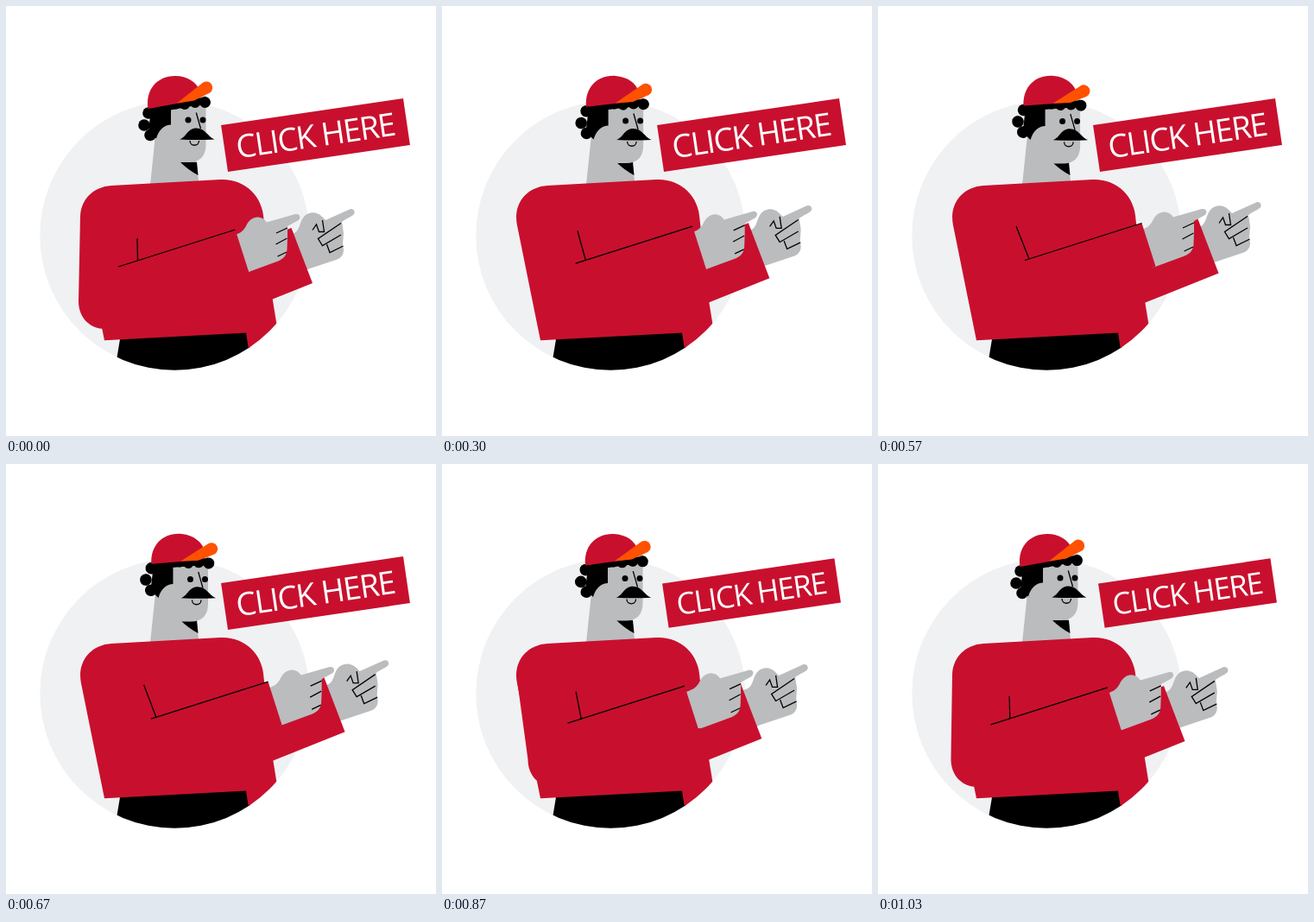
An HTML page that plays this animation: 498x498 px, repeating every 1060 ms.

```html
<!DOCTYPE html>
<html lang="en">
<head>
<meta charset="utf-8">
<title>Click here</title>
<style>
  html, body { margin: 0; width: 100%; height: 100%; overflow: hidden; background: #fff; }
  svg { display: block; width: 100vw; height: 100vh; }
  .red { fill: #c8102e; }
  .skin { fill: #bbbcbe; }
  .line { fill: none; stroke: #000; stroke-width: 1.3; }
  text { font: 400 37px "Open Sans", "Noto Sans", sans-serif; letter-spacing: -1.5px; fill: #fff; text-anchor: middle; }
</style>
</head>
<body>
<svg viewBox="0 0 498 498">
  <defs><clipPath id="disc"><circle cx="195.300" cy="265.800" r="156"/></clipPath></defs>
  <circle cx="195.300" cy="265.800" r="156" fill="#f0f1f3"/>

  <!-- far arm -->
  <g id="farHand">
    <path class="skin" d="M300 276 L334 263 C341 259 340 248 346 243 C352 238 360 238 366 244 L370 248 L398 235.400 C402 234 405 238 403 241 C402 243 396 245 389 250 L391 263 L390 276 L391 282 C391 288 388 292 382 294 L349 305 L318 318 Z"/>
    <path class="line" d="M355 259.500 L359.500 253 L362.500 261.500 L368.500 261.500 L366.500 248 M388 251.500 L361.500 269.500 L366.500 277.500 L388 265 M371.500 276 L375 285.500 L390.500 278"/>
  </g>
  <path id="farSleeve" class="red" d="M330.500 257 L355 321 L255 361 L230 297 Z"/>

  <!-- neck -->
  <path class="skin" d="M174 140 L166.500 212 L224 212 L220 175 Z"/>
  <path d="M201 180 L221 181 L222.500 196 Q211 190 201 180 Z"/>

  <g clip-path="url(#disc)">
    <path d="M133 380 L128 410 L128 430 L290 430 L278 374 Z"/>
    <path class="red" d="M114 387.300 L87 254 C82 229 98 209.500 122 208 L248 201 C276 199.500 297.500 220 298.500 247 L308.500 338 L313.500 369 L320 430 L286 430 L278 378.500 Z"/>
    <path id="elbow" class="red"/>
  </g>

  <!-- head -->
  <g id="face">
    <path class="skin" d="M174 112 L231.500 104 L231.500 161 C231.500 174 224 181 212 181 L196 181 L172 165 Z"/>
    <path d="M168 119 L191 113 L191 137.500 C184 137.500 177 143 174 153.500 L165 145 Z"/>
    <circle cx="211" cy="132" r="3.500"/>
    <circle cx="228" cy="132" r="3.500"/>
    <path class="line" d="M220.300 123.500 L225.500 142"/>
    <path class="line" d="M213 156 C213 163 223.500 163 223.500 156"/>
  </g>
  <path id="moustache" d="M201 154.500 C209 152 210 141.500 220.500 141.500 C231 141.500 233 151 241.500 154.500 Q221 155.500 201 154.500 Z"/>
  <g id="cap">
    <path d="M168 118 L217 107 L231 106 L231 113 L188 121 L172 124 Z"/>
    <g id="curls"></g>
    <path class="red" d="M164.500 119 C161 97 175 81 196 81 C210 81 220 88 224 97 L217 109.500 Z"/>
    <path fill="#ff5100" d="M198 112.500 L228 88.700 A7.100 7.100 0 0 1 236 100.500 L218 109.600 Z"/>
  </g>

  <!-- near arm -->
  <g id="nearHand">
    <path class="skin" d="M244 274 L267 264.500 C279 260 277 252 284 247 C290 242.500 298 244 302 250.500 L335 241 C341 240 342 246 338 248.500 L326 255 L326 268 L325.500 282 C325 289 321 293 315 295.500 L281 308 L254 311 Z"/>
    <path class="line" d="M313 263 L326 257 M312.500 276 L325.500 269 M314.500 290 L325 285"/>
  </g>
  <g id="nearSleeve">
    <path class="red" d="M265.500 259 L281.500 309 L171.500 344 L130 302 Z"/>
    <path class="line" d="M130 302 L265.500 259"/>
  </g>
  <path id="fold" class="line"/>

  <g id="sign">
    <rect class="red" x="-106.600" y="-27.300" width="213.200" height="54.600"/>
    <text x="-0.500" y="13.600">CLICK HERE</text>
  </g>
</svg>
<script>
const LOOP = 1060, STEP = 33.34;
const el = id => document.getElementById(id);
const set = (id, value, attr = "transform") => el(id).setAttribute(attr, value);

const curls = [[165, 124, 6.8], [160, 138, 6.8], [167, 149.5, 6.8],
               [197, 114.5, 5], [207, 114, 6], [219, 111.5, 6.5], [230.5, 111.5, 6.5]];
el("curls").innerHTML = curls.map(([x, y, r]) => `<circle cx="${x}" cy="${y}" r="${r}"/>`).join("");

const ease = (t, from, to) => {
  const u = Math.min(1, Math.max(0, (t - from) / (to - from)));
  return (1 - Math.cos(Math.PI * u)) / 2;
};
const lift = (p, height) => -height * Math.pow(p, 1.4);
const move = (id, x, y) => set(id, `translate(${x} ${y})`);

function draw(t) {
  const out = ease(t, 30, 500);
  const arm = out * (1 - ease(t, 600, 1066));
  const hand = out * (1 - ease(t, 640, 1095)); // trails the sleeve on the way back
  const dx = 40 * arm, dy = lift(arm, 7.5);

  move("nearHand", 40 * hand, lift(hand, 6));
  move("farHand", 40 * hand, lift(hand, 8));
  move("nearSleeve", dx, dy);
  move("farSleeve", 39.5 * arm, lift(arm, 11.5));

  const fx = 152.5 + 22.5 * arm;
  const fy = 302 + dy - (fx - 130 - dx) * 43 / 135.5;
  set("fold", `M${152 + 8 * arm} ${269 - 14 * arm} L${fx} ${fy}`, "d");

  const ex = 84 + dx;
  set("elbow", `M86 243 L${ex} 342 C${ex} 361 ${ex + 13} 374 ${ex + 31} 374 L220 360 L220 243 Z`, "d");

  move("face", 2.6 * arm, 1.6 * arm);
  move("moustache", 1.6 * arm, 0.8 * arm);
  set("cap", `rotate(${6.2 * arm} 199 155)`);

  const size = t > 765 ? 0.945 : 1;
  set("sign", `translate(358.5 149.5) rotate(-8.36) scale(${size})`);
}

const start = performance.now();
function tick() {
  const t = (performance.now() - start) % LOOP;
  draw(Math.min(31, Math.floor((t + 4) / STEP)) * STEP);
  requestAnimationFrame(tick);
}
tick();
</script>
</body>
</html>
```
